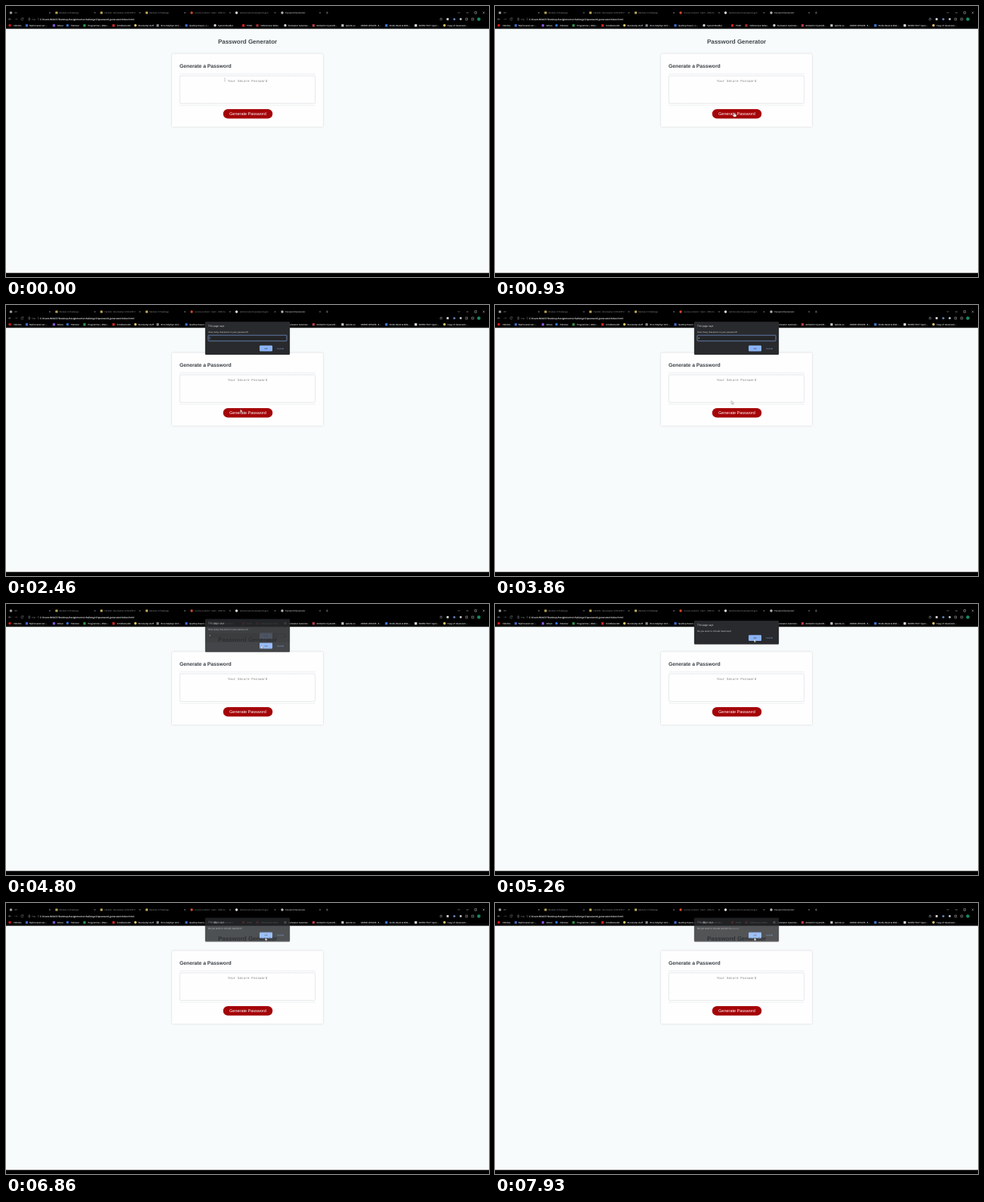
Animation, 640 px wide and 360 px high, one loop 8000 ms. Source, as an HTML page:

```html
<!DOCTYPE html>
<html lang="en">
<head>
<meta charset="utf-8">
<title>Password Generator</title>
<style>
  html, body { margin: 0; width: 100%; height: 100%; overflow: hidden; background: #000; }
  svg { display: block; width: 640px; height: 360px; }
  text { font-family: "Open Sans", sans-serif; text-rendering: geometricPrecision; white-space: pre; }
  .tab { font-size: 2.8px; fill: #96989b; }
  .tab.on { fill: #f4f5f7; }
  .mark { font-size: 2.75px; font-weight: 600; fill: #f0f1f3; }
  .url { font-size: 3.15px; font-weight: 600; fill: #fff; }
  .file { font-size: 2.9px; fill: #9aa0a6; }
  .line { fill: none; stroke: #9aa0a6; stroke-width: .45; }
  .head { font: bold 8px "Liberation Sans", Arial, sans-serif; fill: #40464c; }
  .sub { font: bold 6.75px "Liberation Sans", Arial, sans-serif; fill: #363c42; }
  .press { font: 5.5px "Liberation Sans", Arial, sans-serif; fill: #fff; }
  .hint { font: 4.4px "Liberation Mono", monospace; fill: #858585; }
  .mid { text-anchor: middle; }
  .card { filter: drop-shadow(0 .5px 1px rgba(0, 0, 0, .18)); }
  .says { font-size: 3.2px; fill: #f1f3f4; }
  .ask { font-size: 2.82px; fill: #e4e6e9; }
  .btn { font-size: 2.8px; fill: #8ab4f8; }
  .btn.ok { fill: #202124; }

  .dialog, .cursor, .shape, .typed, .caret, .field { animation: 8s linear infinite; }
  .dialog { opacity: 0; }
  #length { animation-name: length; }
  #lower { animation-name: lower; }
  #upper { animation-name: upper; }
  #numbers { animation-name: numbers; }
  #special { animation-name: special; }

  @keyframes length {
    0%, 24.125% { opacity: 0; transform: translateY(-3px); animation-timing-function: ease-in; }
    26.625% { opacity: 1; }
    27.875% { transform: none; }
    59.125% { opacity: 1; transform: none; animation-timing-function: ease-in; }
    60% { transform: translateY(-2.2px); }
    62.125%, 100% { opacity: 0; transform: translateY(-3px); }
  }
  @keyframes lower {
    0%, 59.125% { opacity: 0; transform: translateY(-3px); animation-timing-function: ease-in; }
    61.625% { opacity: 1; }
    62.875% { transform: none; }
    72.375% { opacity: 1; transform: none; animation-timing-function: ease-in; }
    73.25% { transform: translateY(-2.2px); }
    75.375%, 100% { opacity: 0; transform: translateY(-3px); }
  }
  @keyframes upper {
    0%, 72.375% { opacity: 0; transform: translateY(-3px); animation-timing-function: ease-in; }
    74.875% { opacity: 1; }
    76.125% { transform: none; }
    84.1% { opacity: 1; transform: none; animation-timing-function: ease-in; }
    85% { transform: translateY(-2.2px); }
    87.1%, 100% { opacity: 0; transform: translateY(-3px); }
  }
  @keyframes numbers {
    0%, 84.1% { opacity: 0; transform: translateY(-3px); animation-timing-function: ease-in; }
    86.6% { opacity: 1; }
    87.85% { transform: none; }
    97.45% { opacity: 1; transform: none; animation-timing-function: ease-in; }
    98.35% { transform: translateY(-2.2px); }
    100% { opacity: .2; transform: translateY(-3px); }
  }
  @keyframes special {
    0%, 97.45% { opacity: 0; transform: translateY(-3px); animation-timing-function: ease-in; }
    100% { opacity: 1; transform: translateY(-1.2px); }
  }

  .typed, .caret, .field { animation-timing-function: step-end; }
  .typed { animation-name: typed; }
  .caret { animation-name: caret; }
  .field { animation-name: blur; }
  @keyframes typed { 0% { opacity: 0; } 44.125%, 100% { opacity: 1; } }
  @keyframes caret { 0% { opacity: 1; } 44.125%, 100% { opacity: 0; } }
  @keyframes blur { 0% { stroke: #8ab4f8; } 58.25%, 100% { stroke: #333438; } }

  .cursor { animation-name: move; }
  @keyframes move {
    0%, .75% { transform: translate(290px, 98px); animation-timing-function: ease-in-out; }
    9.125% { transform: translate(317.5px, 142.5px); }
    11.625%, 24.125% { transform: translate(317px, 142px); }
    30.75% { transform: translate(310.5px, 138.5px); animation-timing-function: ease-in-out; }
    38.25%, 47.5% { transform: translate(313px, 128px); animation-timing-function: ease-in-out; }
    57.5%, 60% { transform: translate(338px, 55px); animation-timing-function: ease-in-out; }
    68.25%, 73.25% { transform: translate(344.3px, 44.5px); }
    79.125%, 100% { transform: translate(343.5px, 46px); }
  }
  .shape { animation-timing-function: step-end; }
  .beam { animation-name: beam; }
  .hand { animation-name: hand; }
  .arrow { animation-name: arrow; }
  @keyframes beam { 0% { opacity: 1; } 4%, 100% { opacity: 0; } }
  @keyframes hand { 0% { opacity: 0; } 8% { opacity: 1; } 26%, 100% { opacity: 0; } }
  @keyframes arrow { 0% { opacity: 0; } 4% { opacity: 1; } 8% { opacity: 0; } 26%, 100% { opacity: 1; } }
</style>
</head>
<body>
<svg viewBox="0 0 640 360">
  <rect width="640" height="360" fill="#000"/>
  <g id="chrome"></g>

  <g class="line">
    <path d="M7 17.5H3.5M5 16 3.5 17.5 5 19"/>
    <path d="M11.5 17.5H15M13.5 16 15 17.5 13.5 19" opacity=".5"/>
    <path d="M22.8 16.6A1.6 1.6 0 1 0 23 18M23 15.5V16.8H21.7"/>
    <path d="M423.8 9H427.2M425.5 7.3V10.7"/>
    <path d="M598.7 8.2 600 9.5 601.3 8.2M609.8 9H612.8M621 7.6h2.6v2.6h-2.6zM631.7 7.6 634.3 10.2M634.3 7.6 631.7 10.2" stroke="#ddd"/>
    <path d="M575.2 18.8V16.6H577.8V18.8ZM576.5 17.5V15.6"/>
    <path d="M609 16.2h2.6v2.6H609zM617 16.2h2.8v2.6H617z" stroke="#ddd"/>
    <path d="M30 16h1.7v3H30zM42.8 15.8V19.2"/>
  </g>
  <rect x="583.8" y="16" width="2.8" height="3" fill="#c9cbcf"/>
  <circle cx="594" cy="17.5" r="1.5" fill="#5d83b8"/>
  <circle cx="602.5" cy="17.5" r="1.4" fill="#c8cacc"/>
  <circle cx="626.5" cy="17.5" r="2.2" fill="#168a67"/>
  <text x="34.5" y="18.6" class="file">File</text>
  <text x="45" y="18.6" class="url">C:/Users/MILO7/Desktop/Assignments/challenge3/password-generator/index.html</text>

  <rect y="30.3" width="640" height="324.3" fill="#f8fbfc"/>
  <text x="320" y="50.4" class="head mid">Password Generator</text>
  <rect x="220" y="63.5" width="200" height="97" rx="1.25" fill="#fefefe" class="card"/>
  <text x="230" y="81.8" class="sub">Generate a Password</text>
  <path d="M230 90.2H410M230 131.9H410" stroke="#dfe2e5" stroke-width=".6"/>
  <rect x="230.3" y="92.8" width="179.4" height="36.6" rx="1.2" fill="none" stroke="#a9b0ba" stroke-width=".5" stroke-dasharray="1.1 .8"/>
  <text x="320" y="101.2" class="hint mid">Your Secure Password</text>
  <rect x="287.8" y="137" width="65.4" height="12.6" rx="6.2" fill="#a40408"/>
  <text x="320.4" y="145.2" class="press mid">Generate Password</text>

  <g id="dialogs"></g>

  <g class="cursor">
    <path class="shape beam" d="M-.7-2H.7M0-2V2M-.7 2H.7" fill="none" stroke="#777" stroke-width=".35"/>
    <path class="shape hand" d="M-.6 0Q0-.7.6 0V1.7L2.7 2.3Q3.2 2.6 3 3.4L2.4 5.2H-.6L-2 3.2Q-1.7 2.4-.6 3.1Z" fill="#fff" stroke="#111" stroke-width=".3"/>
    <path class="shape arrow" d="M0 0V4.3L1 3.4 1.7 5 2.4 4.7 1.7 3.1H3.1Z" fill="#fff" stroke="#111" stroke-width=".25"/>
  </g>
</svg>
<script>
  const byId = id => document.getElementById(id);
  const label = (x, y, cls, s) => `<text x="${x}" y="${y}" class="${cls}">${s}</text>`;
  const dot = (x, y, color) => `<circle cx="${x}" cy="${y}" r="1.7" fill="${color}"/>`;
  const square = (x, y, color) => `<rect x="${x - 1.6}" y="${y - 1.6}" width="3.2" height="3.2" rx=".4" fill="${color}"/>`;
  const close = (x, y) => `<path class="line" d="M${x - 1} ${y - 1}l2 2m0-2l-2 2"/>`;

  const tabs = [
    [6.5, 'IPE', '#9aa0a6', 11],
    [67, 'Module 3 Challenge', '#b9a65a', 70.5],
    [126.5, 'Huddlo - Bootcamp: UCB-VIRT-F', '#b9a65a', 130.5],
    [186.5, 'Module 3 Challenge', '#b9a65a', 190],
    [246, 'course-content · main · UCB-Co', '#d9472b', 250],
    [305.5, 'larkmoraine/3 password-gen', '#e4e4e4', 310],
    [366, 'Password Generator', '#b5b8bc', 370]
  ];
  const marks = [
    [5, 'Vidorbo', '#e01818', 10],
    [27.5, 'MyTrovanel.net ...', '#3f66c8', 31],
    [63.5, 'Glivvo', '#8653e0', 68],
    [81.5, 'Palnoter', '#2f74e0', 86],
    [104, 'Programme | Watc...', '#2f9a4d', 108.5],
    [142.5, 'brindlemark6', '#d62525', 147],
    [171.5, 'Bootcamp stuff', '#e3c869', 175.5],
    [201, 'Orvo Kelphyn G14 ...', '#8a8d92', 205],
    [239, 'Quellop Haven | (...', '#3d6ad0', 243],
    [277, 'System Builder', '#d8d8d8', 281],
    [314.5, 'TOVU', '#d92020', 319],
    [333, 'Fellstonivar Roles', '#b02a30', 337.5],
    [370, 'Dunwater Automat...', '#d8d8d8', 374],
    [407.5, 'Amberlin Crystal B...', '#c43a4a', 411.5],
    [446, '3plonk.co', '#c8c8c8', 450],
    [0, 'VARNO ATELIER - E...', '', 470],
    [504, 'Ondle Book & Web ...', '#3f7be0', 508],
    [543, 'MORVI TELT: Spon...', '#e8e8e8', 547],
    [581, 'Copy of classroom...', '#e3c869', 585]
  ];

  byId('chrome').innerHTML =
    tabs.map(([x, name, color, tx], i) => {
      const on = i === tabs.length - 1;
      return (i > 3 ? dot : square)(x, 9, color) + label(tx, 10, on ? 'tab on' : 'tab', name) +
        close(58 + i * 59.7, 9);
    }).join('') +
    marks.map(([x, name, color, tx], i) =>
      (x ? (i % 3 ? square : dot)(x, 25.8, color) : '') + label(tx, 26.9, 'mark', name)
    ).join('');

  const dialog = (id, question, height, field = '') => {
    const y = 22.5 + height - 8.3;
    return `<g class="dialog" id="${id}">
      <rect x="264" y="22.5" width="112" height="${height}" rx="1" fill="#292a2d" stroke="#3c3d40" stroke-width=".3"/>
      ${label(268, 29.3, 'says', 'This page says')}
      ${label(268, 36.5, 'ask', question)}
      ${field}
      <rect x="336" y="${y - 4}" width="17" height="7.8" rx="1" fill="#8ab4f8"/>
      ${label(344.5, y + 1, 'btn ok mid', 'OK')}
      ${label(363.7, y + 1, 'btn mid', 'Cancel')}
    </g>`;
  };
  const field = `<rect class="field" x="268" y="40.2" width="104" height="7.6" rx=".8" fill="#242528" stroke-width=".6"/>
    <path class="caret" d="M270 42.2V45.8" stroke="#e8eaed" stroke-width=".35"/>
    ${label(269.6, 45.1, 'ask typed', '8')}`;
  const include = what => `Do you want to include ${what}?`;

  byId('dialogs').innerHTML =
    dialog('length', 'How many characters in your password?', 43.5, field) +
    dialog('lower', include('lowercase'), 31) +
    dialog('upper', include('uppercase'), 31) +
    dialog('numbers', include('numbers'), 31) +
    dialog('special', include('special characters'), 31);
</script>
</body>
</html>
```
